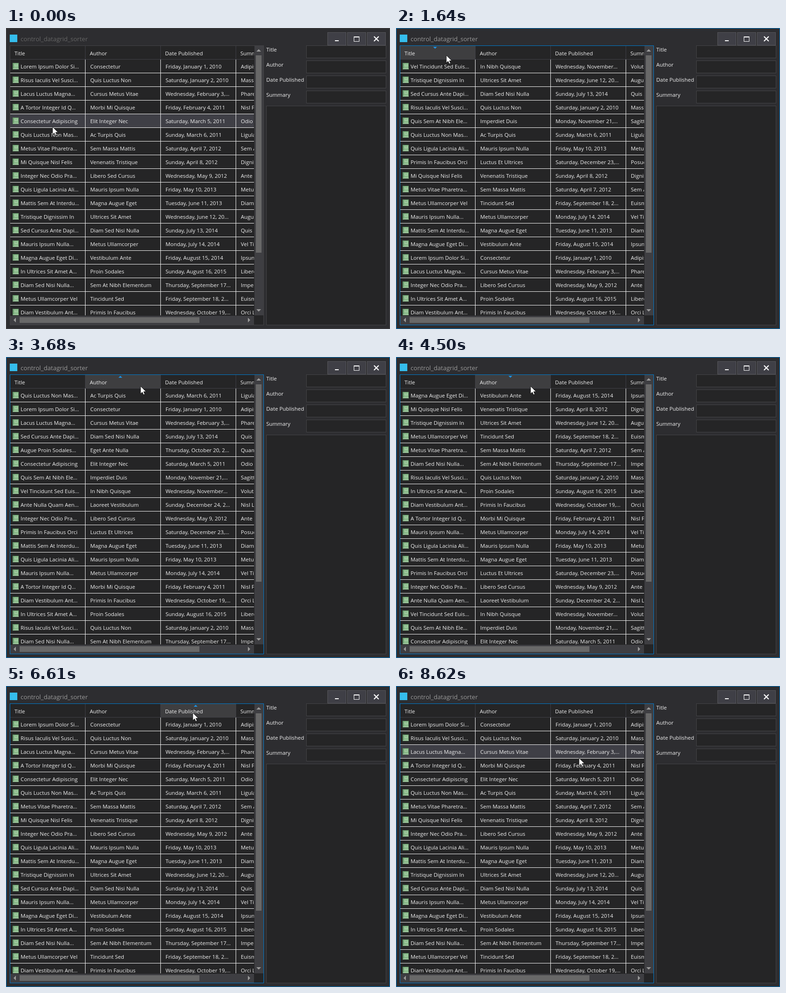
An HTML page with a canvas that plays this animation: 816x639 px, repeating every 8750 ms.

```html
<!DOCTYPE html>
<html lang="en">
<head>
<meta charset="utf-8">
<title>Data grid sorting</title>
<style>
html, body { margin: 0; width: 100%; height: 100%; overflow: hidden; background: #2d2d30; }
canvas { display: block; }
</style>
</head>
<body>
<canvas id="stage" width="816" height="639"></canvas>
<script>
const ctx = document.getElementById('stage').getContext('2d');
const LOOP = 8750;
const FONT = '"Open Sans", "Noto Sans", sans-serif';
const BLUE = '#007acc', PANEL = '#252526', EDGE = '#434346', TEXT = '#f1f1f1';
const COLUMN = 160, ROW = 29, ROWS_TOP = 67;
const HEADERS = ['Title', 'Author', 'Date Published', 'Summary'];

// Title | Author | Date | Summary, already in date order.
const books = `Lorem Ipsum Dolor Si...|Consectetur|Friday, January 1, 2010|Adipiscing
Risus Iaculis Vel Susci...|Quis Luctus Non|Saturday, January 2, 2010|Massa
Lacus Luctus Magna...|Cursus Metus Vitae|Wednesday, February 3,...|Pharetra
A Tortor Integer Id Q...|Morbi Mi Quisque|Friday, February 4, 2011|Nisl Felis
Consectetur Adipiscing|Elit Integer Nec|Saturday, March 5, 2011|Odio
Quis Luctus Non Mas...|Ac Turpis Quis|Sunday, March 6, 2011|Ligula
Metus Vitae Pharetra...|Sem Massa Mattis|Saturday, April 7, 2012|Sem At
Mi Quisque Nisl Felis|Venenatis Tristique|Sunday, April 8, 2012|Dignissim
Integer Nec Odio Pra...|Libero Sed Cursus|Wednesday, May 9, 2012|Ante
Quis Ligula Lacinia Ali...|Mauris Ipsum Nulla|Friday, May 10, 2013|Metus
Mattis Sem At Interdu...|Magna Augue Eget|Tuesday, June 11, 2013|Diam
Tristique Dignissim In|Ultrices Sit Amet|Wednesday, June 12, 20...|Augue
Sed Cursus Ante Dapi...|Diam Sed Nisi Nulla|Sunday, July 13, 2014|Quis Sem
Mauris Ipsum Nulla...|Metus Ullamcorper|Monday, July 14, 2014|Vel Tincidunt
Magna Augue Eget Di...|Vestibulum Ante|Friday, August 15, 2014|Ipsum
In Ultrices Sit Amet A...|Proin Sodales|Sunday, August 16, 2015|Libero
Diam Sed Nisi Nulla...|Sem At Nibh Elementum|Thursday, September 17...|Imperdiet
Metus Ullamcorper Vel|Tincidunt Sed|Friday, September 18, 2...|Euismod
Diam Vestibulum Ant...|Primis In Faucibus|Wednesday, October 19,...|Orci Luctus
Augue Proin Sodales...|Eget Ante Nulla|Thursday, October 20, 2...|Quam
Quis Sem At Nibh Ele...|Imperdiet Duis|Monday, November 21,...|Sagittis
Vel Tincidunt Sed Euis...|In Nibh Quisque|Wednesday, November...|Volutpat
Primis In Faucibus Orci|Luctus Et Ultrices|Saturday, December 23,...|Posuere
Ante Nulla Quam Aen...|Laoreet Vestibulum|Sunday, December 24, 2...|Nisl Lacinia`
  .split('\n').map(line => line.split('|'));

// Each header is clicked three times: ascending, descending, unsorted.
const clicks = [
  [530, 670], [1500, 1640], [2520, 2610],
  [3540, 3680], [4370, 4500], [5240, 5370],
  [6350, 6440], [6990, 7070], [7900, 8040]
];

// start, end, x, y of each pointer move
const START = [99, 210];
const moves = [
  [30, 355, 107, 58],
  [2850, 3450, 286, 62],
  [5565, 5930, 396, 56],
  [6609, 6610, 397, 57],
  [8375, 8620, 389, 153]
];

function pointerAt(time) {
  let [x, y] = START;
  for (const [start, end, toX, toY] of moves) {
    const u = Math.min(1, Math.max(0, (time - start) / (end - start)));
    const eased = u * u * (3 - 2 * u);
    x += (toX - x) * eased;
    y += (toY - y) * eased;
  }
  return [Math.round(x), Math.round(y)];
}

function gridState(time) {
  const done = clicks.filter(([, release]) => time >= release).length;
  const last = done - 1;
  const next = clicks[done];
  const pressed = next && time >= next[0] ? Math.floor(done / 3) : -1;
  const order = done ? [1, -1, 0][last % 3] : 0;
  return { order, pressed, column: Math.floor(last / 3), active: time >= clicks[0][0] };
}

function sortedBooks({ order, column }) {
  if (!order) return books;
  if (column === 2) return order > 0 ? books : [...books].reverse();
  return [...books].sort((a, b) => order * (a[column] < b[column] ? -1 : 1));
}

function rect(x, y, w, h, color) {
  ctx.fillStyle = color;
  ctx.fillRect(x, y, w, h);
}

function frame(x, y, w, h, edge, fill) {
  rect(x, y, w, h, edge);
  rect(x + 1, y + 1, w - 2, h - 2, fill);
}

function polygon(points, color) {
  ctx.beginPath();
  points.forEach(([x, y]) => ctx.lineTo(x, y));
  ctx.closePath();
  ctx.fillStyle = color;
  ctx.fill();
}

function label(text, x, y, color = TEXT, size = 11.4) {
  ctx.font = `${size}px ${FONT}`;
  ctx.fillStyle = color;
  ctx.fillText(text, x, y);
}

function drawWindow(active) {
  frame(0, 0, 816, 639, active ? BLUE : EDGE, '#2d2d30');
  rect(8, 14, 16, 16, '#35bdec');
  label('control_datagrid_sorter', 31, 28, active ? '#999' : '#656565', 13.1);

  for (const x of [683, 725, 767]) frame(x, 9, 40, 28, '#55555a', '#3f3f46');
  rect(699, 26, 8, 2, '#fff');
  frame(739, 18, 12, 11, '#fff', '#3f3f46');
  rect(739, 18, 12, 2, '#fff');
  ctx.strokeStyle = '#fff';
  ctx.lineWidth = 2.2;
  ctx.beginPath();
  ctx.moveTo(782, 18);
  ctx.lineTo(792, 28);
  ctx.moveTo(792, 18);
  ctx.lineTo(782, 28);
  ctx.stroke();

  HEADERS.forEach((name, i) => {
    label(name, 553, 50 + 32 * i);
    frame(638, 37 + 32 * i, 170, 27, EDGE, PANEL);
  });
  frame(553, 165, 255, 466, EDGE, PANEL);
}

function drawBookIcon(x, y) {
  frame(x, y, 13, 14, '#5f8d62', '#8abb8b');
  rect(x + 1, y + 1, 2, 12, '#6f9f71');
  rect(x + 4, y + 3, 7, 4, '#a9d0a8');
  rect(x + 5, y + 4, 5, 1, '#6f9f71');
  rect(x + 1, y + 12, 12, 1, '#b9d5b8');
}

function drawHeader(state, [px, py]) {
  HEADERS.forEach((name, i) => {
    const x = 9 + COLUMN * i;
    const pressed = state.pressed === i;
    const hovered = py < ROWS_TOP && px >= x && px < x + COLUMN;
    if (pressed || hovered) rect(x, 38, COLUMN - 1, 28, pressed ? BLUE : '#3e3e40');
    rect(x + COLUMN - 1, 38, 1, 29, '#3f3f46');
    label(name, x + 9, 58);
    if (state.order && state.column === i) {
      const [base, tip] = state.order > 0 ? [44, 40] : [40, 44];
      polygon([[x + 70, base], [x + 78, base], [x + 74, tip]], pressed ? '#fff' : '#1c97ea');
    }
  });
  rect(9, 66, 518, 1, '#3f3f46');
}

function drawRows(state, [, py]) {
  const hovered = Math.floor((py - ROWS_TOP) / ROW);
  sortedBooks(state).slice(0, 19).forEach((book, i) => {
    const y = ROWS_TOP + ROW * i;
    if (i === hovered) rect(9, y, 518, ROW - 1, '#3f3f46');
    drawBookIcon(14, y + 7);
    book.forEach((text, c) => label(text, c ? 19 + COLUMN * c : 31, y + 19));
    rect(9, y + ROW - 1, 518, 1, TEXT);
  });
  for (const x of [168, 328, 488]) rect(x, ROWS_TOP, 1, 543, TEXT);
}

function drawScrollbars() {
  rect(528, 38, 19, 572, '#3e3e42');
  rect(531, 58, 12, 419, '#686868');
  polygon([[532, 50], [542, 50], [537, 45]], '#999');
  polygon([[532, 597], [542, 597], [537, 602]], '#999');
  rect(9, 611, 518, 19, '#3e3e42');
  rect(29, 614, 382, 12, '#686868');
  polygon([[21, 615], [21, 625], [16, 620]], '#999');
  polygon([[514, 615], [514, 625], [519, 620]], '#999');
}

function drawPointer([x, y]) {
  const outline = [[0, 0], [0, 16], [3.7, 12.6], [6.2, 18], [8.8, 17], [6.5, 11.6], [11.5, 11.4]];
  const points = outline.map(([dx, dy]) => [x + dx, y + dy]);
  polygon(points, '#fff');
  ctx.strokeStyle = '#111';
  ctx.lineWidth = 0.8;
  ctx.stroke();
}

function draw(time) {
  const state = gridState(time);
  const pointer = pointerAt(time);
  drawWindow(state.active);
  frame(8, 37, 540, 594, state.active ? BLUE : EDGE, PANEL);
  ctx.save();
  ctx.beginPath();
  ctx.rect(9, 38, 518, 572);
  ctx.clip();
  drawRows(state, pointer);
  drawHeader(state, pointer);
  ctx.restore();
  drawScrollbars();
  drawPointer(pointer);
}

const began = performance.now();
function tick() {
  draw((performance.now() - began) % LOOP);
  requestAnimationFrame(tick);
}
tick();
</script>
</body>
</html>
```
